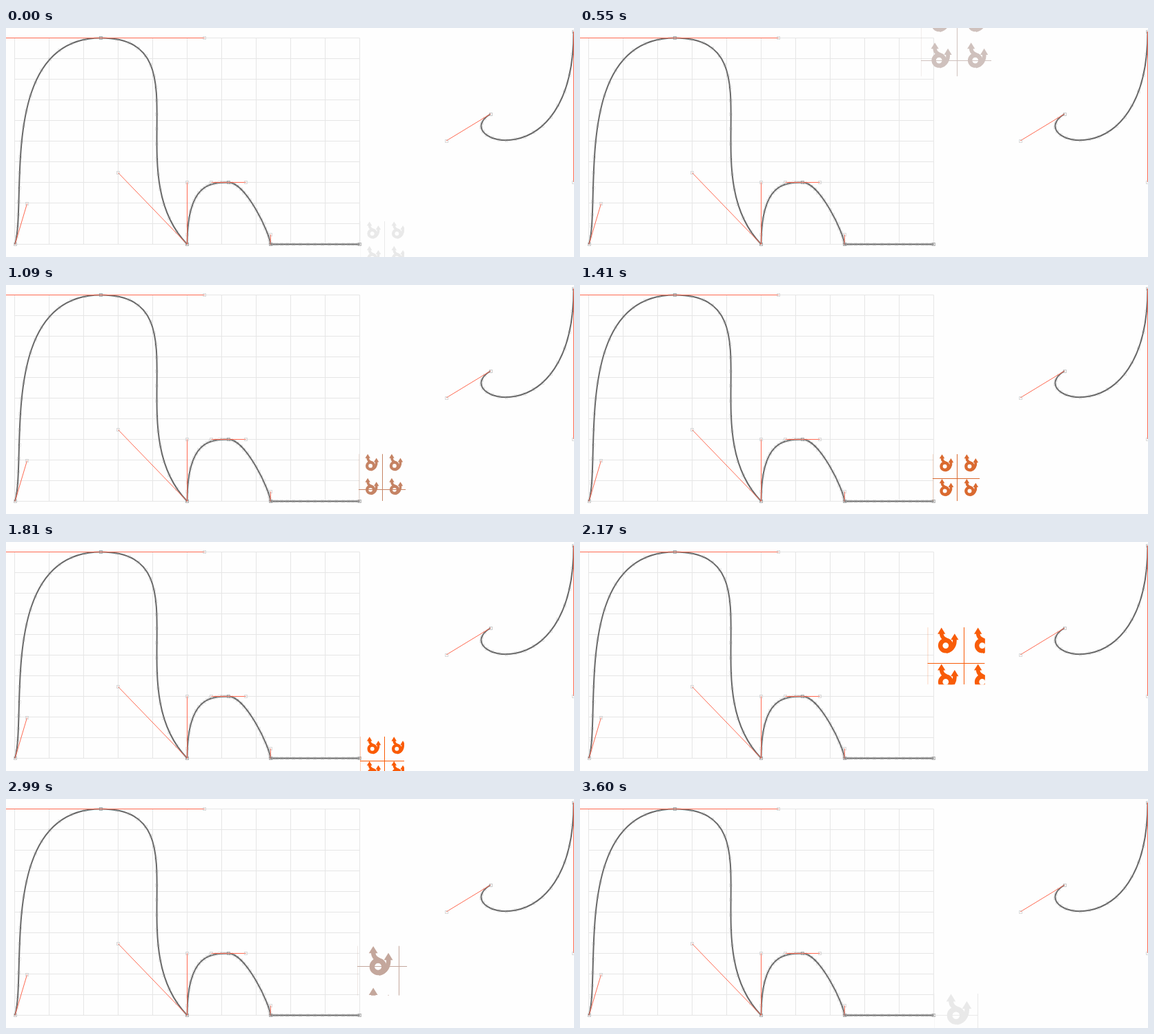
An HTML page with a canvas for the animation above (3.62 s loop, 823 by 333 pixels).

```html
<!DOCTYPE html>
<html lang="en">
<head>
<meta charset="utf-8">
<title>Easing curve</title>
<style>
html, body { margin: 0; width: 100%; height: 100%; overflow: hidden; background: #fefefe; }
canvas { display: block; }
</style>
</head>
<body>
<canvas id="stage" width="823" height="333"></canvas>
<script>
const ctx = document.getElementById('stage').getContext('2d');
const LOOP = 3620;
const RED = '#ff6a52';

// Cubic segments: start, two handles, end
const RISE = [[12.5, 314], [30, 255], [-13, 14], [137, 14]];
const FALL = [[137, 14], [287, 14], [162, 210], [262, 314]];
const BUMP_UP = [[262, 314], [262, 224], [297, 224], [322, 224]];
const BUMP_DOWN = [[322, 224], [347, 224], [383, 300], [382.5, 314]];
const REST = [[382.5, 314], [382.5, 314], [512, 314], [512, 314]];
const HOOK = [[701.5, 124.5], [637.5, 163.5], [822, 223.5], [822, 4.5]];
const CURVE = [RISE, FALL, BUMP_UP, BUMP_DOWN, REST];

// The fall is straightened slightly so that x always grows along it.
const MOTION = [RISE, [FALL[0], [280, 14], FALL[2], FALL[3]], BUMP_UP, BUMP_DOWN, REST];

const mix = (a, b, k) => a + (b - a) * k;
const smooth = k => k * k * (3 - 2 * k);

function bezier(seg, k, axis) {
  const m = 1 - k;
  const [a, b, c, d] = seg.map(p => p[axis]);
  return m * m * m * a + 3 * m * m * k * b + 3 * m * k * k * c + k * k * k * d;
}

function curveY(x) {
  const seg = MOTION.find(s => x <= s[3][0]) || REST;
  let lo = 0, hi = 1;
  for (let i = 0; i < 24; i++) {
    const mid = (lo + hi) / 2;
    if (bezier(seg, mid, 0) < x) lo = mid; else hi = mid;
  }
  return bezier(seg, lo, 1);
}

// Runs along x twice per loop, resting briefly where the fall meets the bump.
function curveX(t) {
  const u = Math.max(0, t < 2145 ? t - 272 : t - 2145);
  return Math.min(512, Math.min(262, 13 + .359 * u) + Math.max(0, .33 * (u - 812)));
}

function line([x0, y0], [x1, y1], color) {
  ctx.strokeStyle = color;
  ctx.lineWidth = 1;
  ctx.beginPath();
  ctx.moveTo(x0, y0);
  ctx.lineTo(x1, y1);
  ctx.stroke();
}

function knob([x, y], color) {
  ctx.strokeStyle = color;
  ctx.lineWidth = 1;
  ctx.strokeRect(Math.round(x) - 2, Math.round(y) - 2, 4, 4);
}

function drawSegment(seg) {
  const [a, b, c, d] = seg;
  ctx.strokeStyle = '#686868';
  ctx.lineWidth = 2;
  ctx.beginPath();
  ctx.moveTo(...a);
  ctx.bezierCurveTo(...b, ...c, ...d);
  ctx.stroke();
  for (let k = 1; k < 18; k++) {
    knob([bezier(seg, k / 18, 0), bezier(seg, k / 18, 1)], 'rgba(170,170,170,.28)');
  }
}

function drawHandles([a, b, c, d]) {
  line(a, b, RED);
  line(c, d, RED);
  for (const p of [b, c]) knob(p, 'rgba(190,190,190,.55)');
  for (const p of [a, d]) knob(p, 'rgba(140,140,140,.45)');
}

function drawEditor() {
  ctx.save();
  ctx.translate(.5, .5);
  for (let x = 12; x <= 512; x += 50) line([x, 14], [x, 314], '#e6e6e6');
  for (let y = 14; y <= 314; y += 30) line([12, y], [512, y], '#e6e6e6');
  const segments = [...CURVE, HOOK];
  segments.forEach(drawSegment);
  segments.forEach(drawHandles);
  ctx.restore();
}

function arrowHead(x, y) {
  ctx.beginPath();
  ctx.moveTo(x, y);
  ctx.lineTo(x + 6.5, y + 10.5);
  ctx.lineTo(x - 6.5, y + 10.5);
  ctx.fill();
}

// Looped double arrow, designed for a cell of 61 units
function icon(x, y, cell) {
  ctx.save();
  ctx.translate(x, y);
  ctx.scale(cell / 61, cell / 61);
  ctx.lineWidth = 7.5;
  ctx.beginPath();
  ctx.arc(0, 0, 8.8, 0, Math.PI * 2);
  ctx.stroke();
  ctx.lineWidth = 6.5;
  ctx.beginPath();
  ctx.moveTo(-7, -21);
  ctx.bezierCurveTo(-7, -12, -1, -11, 6, -7);
  ctx.moveTo(15, -11);
  ctx.bezierCurveTo(16, -2, 12, 8, 1, 10);
  ctx.stroke();
  arrowHead(-7, -30);
  arrowHead(15, -20);
  ctx.restore();
}

// Grey to orange and back, dulled halfway
function tint(phase) {
  const peak = .55;
  const k = smooth(phase < peak ? phase / peak : (1 - phase) / (1 - peak));
  const dull = 200 * k * (1 - k);
  return `rgb(${mix(233, 255, k) - dull}, ${mix(233, 90, k) - .42 * dull}, ${mix(233, 0, k)})`;
}

// Pattern cell as a fraction of the tile
function cellShare(phase) {
  return phase < .5
    ? .555 - .05 * Math.sin(2 * Math.PI * phase)
    : mix(.555, 1, (2 * phase - 1) ** 1.06);
}

function drawTile(t) {
  const phase = t / LOOP;
  const height = 314 - curveY(curveX(t));
  const size = 64 * (1 + .002 * height);
  const left = 545 - size / 2, top = 315 - .993 * height - size / 2;
  const cell = size * cellShare(phase);
  const color = tint(phase);

  ctx.save();
  ctx.beginPath();
  ctx.rect(left, top, size, size);
  ctx.clip();
  ctx.fillStyle = ctx.strokeStyle = color;
  for (let y = cell / 2; y < size + cell / 2; y += cell) {
    for (let x = cell / 2; x < size + cell / 2; x += cell) icon(left + x, top + y, cell);
  }

  // Hairline seams between the cells
  const seam = Math.max(1, Math.round(4 - 4 * phase)) / 2;
  const sx = Math.floor(left + cell) + .5;
  const sy = Math.floor(top + seam * cell) + .5;
  line([sx, top], [sx, top + size], color);
  line([left, sy], [left + size, sy], color);
  ctx.globalAlpha = .3;
  line([left + .5, top], [left + .5, top + size], color);
  ctx.restore();
}

function render(t) {
  ctx.fillStyle = '#fefefe';
  ctx.fillRect(0, 0, 823, 333);
  drawEditor();
  drawTile(t);
}

const begin = performance.now();
function tick() {
  render((performance.now() - begin) % LOOP);
  requestAnimationFrame(tick);
}
tick();
</script>
</body>
</html>
```
